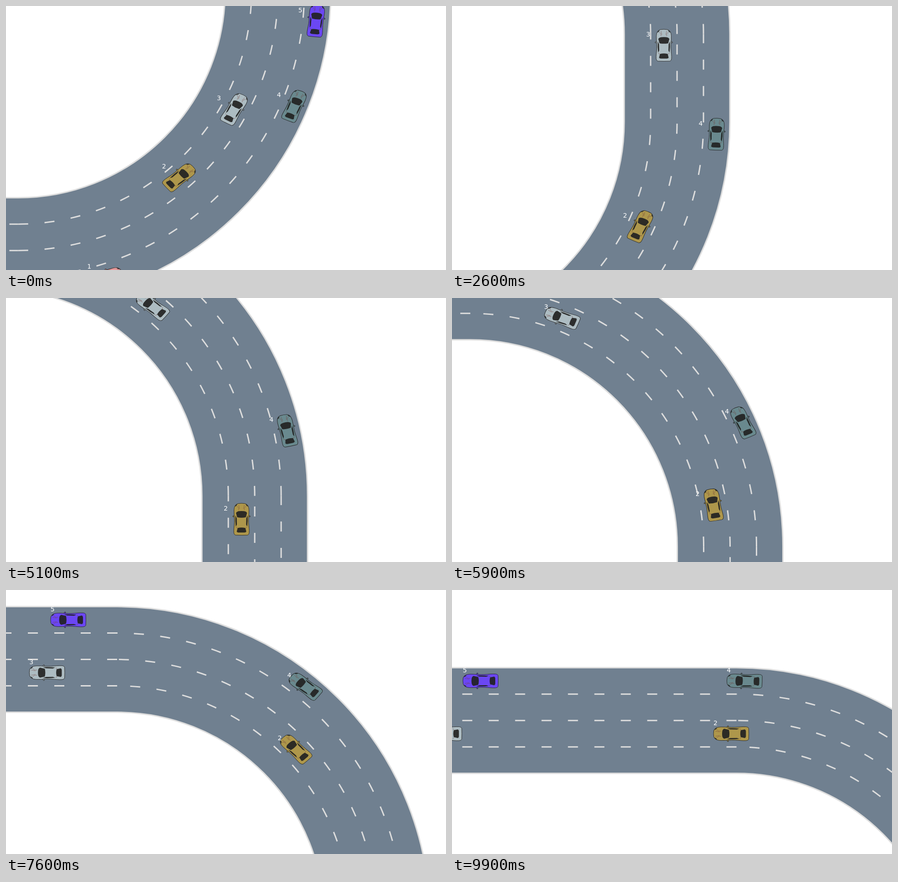
An HTML page for the animation above (10000 ms loop, 966 by 580 pixels).

```html
<!DOCTYPE html>
<html>
<head>
<meta charset="utf-8">
<style>
  html, body { margin: 0; width: 100%; height: 100%; overflow: hidden; background: #fff; }
  svg { display: block; width: 966px; height: 580px; }
  text { font: 14px "DejaVu Sans", sans-serif; fill: #fff; text-anchor: middle; }
  .line { fill: none; stroke: #ddd; stroke-width: 3; }
  .dash { stroke-dasharray: 22 36; }
</style>
</head>
<body>
<svg viewBox="0 0 966 580">
  <defs>
    <g id="trim">
      <g fill="#222" fill-opacity=".92">
        <path d="M-11.5,-14.5 Q-10,-18 -5,-18.6 Q0,-19.2 5,-18.6 Q10,-18 11.5,-14.5 L9,-4.6 Q0,-2.6 -9,-4.6Z"/>
        <path d="M-8,20 Q0,18 8,20 L10,28.5 Q9,30.5 6,30.7 L-6,30.7 Q-9,30.5 -10,28.5Z"/>
        <path id="pane" d="M-12.6,-9 L-10,-2 L-9.6,12 L-11.8,17 Q-13.6,4 -12.6,-9Z"/>
        <use href="#pane" transform="scale(-1 1)"/>
        <path id="lamp" d="M-13.6,-29 Q-12.6,-33.6 -8.6,-34.6 Q-9.6,-31 -13.6,-29Z"/>
        <use href="#lamp" transform="scale(-1 1)"/>
      </g>
      <g fill="none" stroke="#713c38" stroke-opacity=".65" stroke-width=".8">
        <path id="crease" d="M-6,-33 L-4,-24 M-10,-30 Q-5,-28 -6,-21 M-12,18.5 L-8,20.5"/>
        <use href="#crease" transform="scale(-1 1)"/>
      </g>
    </g>
  </defs>
  <g id="world"></g>
</svg>
<script>
const U = 580 / 3;            // length of the side straight
const INNER = 2.35, LANE = 0.3;
const LONG = 4 * U;
const HALF_PI = Math.PI / 2;

const STEPS = [0, 1.1, 2.5, 4.9, 6.4, 8.4, 9.7];
// lane: radius in units; at: distance at each of STEPS; v: speed at the first two
const CARS = [
  { color: "#e6999b", lane: 3.4, at: [1, 1.67, 2.735, 4.62, 5.877, 7.652, 8.822], v: [0.42, 0.70] },
  { color: "#ae974b", lane: 2.8, at: [2, 2.414, 3.176, 5.133, 6.549, 8.538, 9.857], v: [0.35, 0.45] },
  { color: "#adbcc2", lane: 2.8, at: [3, 3.792, 5.27, 7.86, 9.497, 11.69, 13.116], v: [0.42, 0.96] },
  { color: "#69898e", lane: 3.4, at: [4, 4.428, 5.202, 7.091, 8.437, 10.335, 11.59], v: [0.35, 0.45] },
  { color: "#6b47f3", lane: 3.4, at: [5, 5.817, 7.25, 9.675, 11.217, 13.256, 14.588], v: [0.44, 0.97] },
];

const world = document.getElementById("world");

function add(tag, attrs, parent = world) {
  const el = document.createElementNS("http://www.w3.org/2000/svg", tag);
  for (const key in attrs) el.setAttribute(key, attrs[key]);
  parent.appendChild(el);
  return el;
}

// Road pieces; the track's lower bend is centred on the world origin.
const arc = (r, x, y) => `A${r},${r} 0 0 0 ${x},${y}`;
const pieces = r => [
  `M${-LONG},${r} H0`,
  `M0,${r} ${arc(r, r, 0)} V${-U}`,
  `M${r},${-U} ${arc(r, 0, -U - r)}`,
  `M0,${-U - r} H${-LONG}`,
];
const whole = r =>
  `M${-LONG},${r} H0 ${arc(r, r, 0)} V${-U} ${arc(r, 0, -U - r)} H${-LONG}`;

function drawRoad() {
  const radius = i => (INNER + i * LANE) * U;
  add("path", { d: whole(radius(2)), fill: "none", stroke: "#708090", "stroke-width": 4 * LANE * U });
  for (const i of [0, 4]) add("path", { d: whole(radius(i)), class: "line" });
  for (const i of [1, 2, 3])
    for (const d of pieces(radius(i))) add("path", { d, class: "line dash" });
}

function drawCar(car, i) {
  car.el = add("g", {});
  car.body = add("g", {}, car.el);
  const paint = { fill: car.color, stroke: "#252525", "stroke-width": 0.9 };
  for (const side of [-1, 1])
    add("path", { ...paint, d: "M14,-9 L18,-7.6 L18,-5.6 L14,-6Z", transform: `scale(${side} 1)` }, car.body);
  add("path", {
    ...paint,
    d: "M-7,-36.2 Q0,-37.4 7,-36.2 C14,-34 15.4,-28 15.6,-20 C15.6,-10 14.4,-2 14.8,8" +
       " C15.2,17 16.6,24 16,31 Q15.2,36.2 12,36.6 Q0,37.2 -12,36.6 Q-15.2,36.2 -16,31" +
       " C-16.6,24 -15.2,17 -14.8,8 C-14.4,-2 -15.6,-10 -15.6,-20 C-15.4,-28 -14,-34 -7,-36.2Z",
  }, car.body);
  add("use", { href: "#trim" }, car.body);
  add("text", { x: -34.5, y: -19 }, car.el).textContent = i + 1;
}

function slope(car, i) {
  if (i < 2) return car.v[i];
  const rate = k => (car.at[k + 1] - car.at[k]) / (STEPS[k + 1] - STEPS[k]);
  const before = STEPS[i] - STEPS[i - 1];
  if (i === STEPS.length - 1) return rate(i - 1);
  const after = STEPS[i + 1] - STEPS[i];
  return (before * rate(i) + after * rate(i - 1)) / (before + after);
}

function distance(car, time) {
  let i = 0;
  while (i < STEPS.length - 2 && time > STEPS[i + 1]) i++;
  const h = STEPS[i + 1] - STEPS[i];
  const u = (time - STEPS[i]) / h, w = 1 - u;
  return car.at[i] * w * w * (1 + 2 * u) + car.at[i + 1] * u * u * (3 - 2 * u)
    + h * u * w * (slope(car, i) * w - slope(car, i + 1) * u);
}

function pose(s, lane) {
  const bend = lane * HALF_PI, r = lane * U;
  if (s < bend) {
    const a = s / lane;
    return { x: r * Math.sin(a), y: r * Math.cos(a), turn: HALF_PI - a };
  }
  s -= bend;
  if (s < 1) return { x: r, y: -s * U, turn: 0 };
  s -= 1;
  if (s < bend) {
    const a = s / lane;
    return { x: r * Math.cos(a), y: -U - r * Math.sin(a), turn: -a };
  }
  return { x: -(s - bend) * U, y: -U - r, turn: -HALF_PI };
}

function render(ms) {
  let tick = Math.floor((ms % 10000) / 100);
  // two ticks in the cycle stand still
  tick -= (tick >= 6) + (tick >= 46);
  let cx = 0, cy = 0;
  for (const car of CARS) {
    const p = pose(distance(car, tick / 10), car.lane);
    cx += p.x / CARS.length;
    cy += p.y / CARS.length;
    car.el.setAttribute("transform", `translate(${p.x} ${p.y})`);
    car.body.setAttribute("transform", `scale(1.054 .953) rotate(${p.turn * 180 / Math.PI})`);
  }
  world.setAttribute("transform", `translate(${483 - cx} ${290 - cy})`);
}

drawRoad();
CARS.forEach(drawCar);
const start = performance.now();
function loop() {
  render(performance.now() - start);
  requestAnimationFrame(loop);
}
render(0);
requestAnimationFrame(loop);
</script>
</body>
</html>
```
